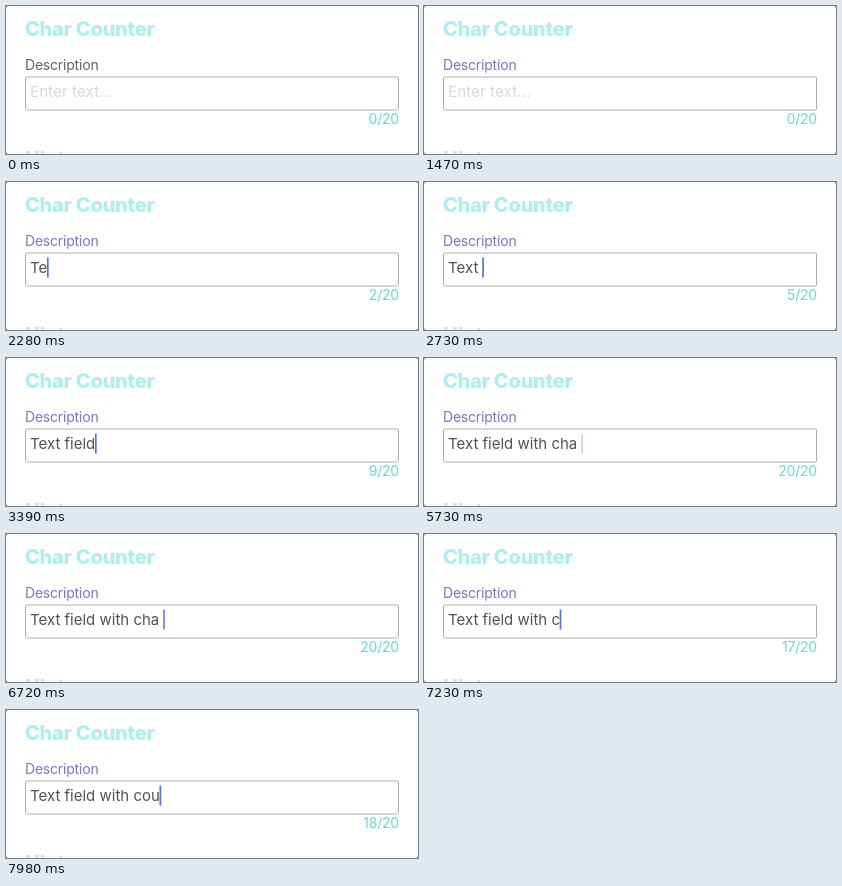
These frames come from a looping animation (412x148 px, 8 s). An HTML page with a canvas:

```html
<!DOCTYPE html>
<html lang="en">
<head>
<meta charset="utf-8">
<title>Char Counter</title>
<style>
  html, body { margin: 0; width: 100%; height: 100%; overflow: hidden; background: #fff; }
  canvas { display: block; width: 412px; height: 148px; }
</style>
</head>
<body>
<canvas id="stage"></canvas>
<script>
const W = 412, H = 148, LOOP = 8000;
const FOCUS = 900;   // the field gains focus
const LAG = 20;      // the counter follows the text
const BLINK = 900;   // caret period
const FONT = 'Inter, "Open Sans", sans-serif';
const COLOR = {
  title: '#abeff5', counter: '#66d8df', label: '#626266', focus: '#8071c8',
  text: '#515158', hint: '#d8d8da', border: '#b0b0b0', caret: '#5a73c8', corner: '#555'
};

// bursts of evenly spaced keys; "<" deletes the last character
const BURSTS = [
  { start: 2110, gap: 150, keys: 'Text ' },
  { start: 2910, gap: 120, keys: 'field w' },
  { start: 3790, gap: 90, keys: 'ith c' },
  { start: 4500, gap: 60, keys: 'ha' },
  { start: 4940, gap: 0, keys: ' ' },
  { start: 6750, gap: 210, keys: '<<<<' },
  { start: 7680, gap: 150, keys: 'cou' }
];
const PRESSES = BURSTS.flatMap(({ start, gap, keys }) =>
  [...keys].map((key, i) => ({ key, at: start + i * gap })));

const canvas = document.getElementById('stage');
const ctx = canvas.getContext('2d');
const ratio = window.devicePixelRatio || 1;
canvas.width = W * ratio;
canvas.height = H * ratio;
ctx.scale(ratio, ratio);

const ramp = (v, from, to) => Math.max(0, Math.min(1, (v - from) / (to - from)));
const pressed = t => PRESSES.filter(p => p.at <= t);
const typed = t => pressed(t).reduce(
  (text, { key }) => key === '<' ? text.slice(0, -1) : text + key, '');

// solid after each key, then a slow blink
function caretAlpha(t) {
  if (t < FOCUS) return 0;
  const last = pressed(t).at(-1)?.at ?? FOCUS;
  const age = (t - last) % BLINK;
  return 1 - ramp(age, 430, 570) + ramp(age, 740, BLINK);
}

function write(str, x, y, size, color, { weight = 400, align = 'left', spacing = 0 } = {}) {
  ctx.font = `${weight} ${size}px ${FONT}`;
  ctx.letterSpacing = `${spacing}px`;
  ctx.textAlign = align;
  ctx.fillStyle = color;
  ctx.fillText(str, x, y);
}

function drawPanel() {
  ctx.fillStyle = COLOR.corner;
  ctx.fillRect(0, 0, W, H);
  ctx.fillStyle = '#fff';
  ctx.beginPath();
  ctx.roundRect(0, 0, W, H, 2);
  ctx.fill();
}

function drawField(t) {
  ctx.strokeStyle = COLOR.border;
  ctx.beginPath();
  ctx.roundRect(19.5, 71, 373, 33, 1);
  ctx.stroke();

  const text = typed(t);
  if (text) write(text, 24, 91, 15, COLOR.text);
  else write('Enter text...', 24, 91, 15, COLOR.hint, { spacing: 0.15 });

  const end = text ? ctx.measureText(text).width : 0;
  ctx.globalAlpha = caretAlpha(t);
  ctx.fillStyle = COLOR.caret;
  ctx.fillRect(23.7 + end, 75.5, 1.7, 20);
  ctx.globalAlpha = 1;
}

function draw(t) {
  const heading = { weight: 800, spacing: -0.25 };
  const small = { spacing: -0.2 };
  drawPanel();
  write('Char Counter', 19, 30, 20, COLOR.title, heading);
  write('Hint', 19, 159.5, 20, COLOR.title, heading);
  write('Description', 19, 64, 14, t < FOCUS ? COLOR.label : COLOR.focus, small);
  drawField(t);
  write(`${typed(t - LAG).length}/20`, 393, 118, 14, COLOR.counter, { ...small, align: 'right' });
}

function tick() {
  draw(performance.now() % LOOP);
  requestAnimationFrame(tick);
}
tick();
</script>
</body>
</html>
```
